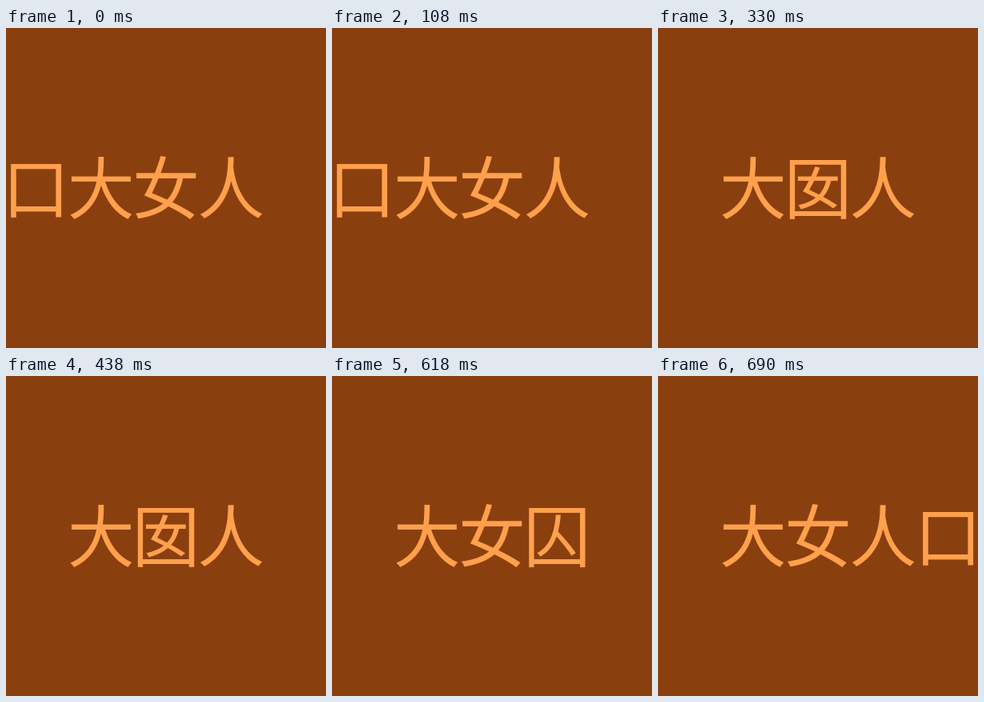
Recreate the animation shown at these times as an HTML page. Size 400 by 400 pixels, loop 0.84 s.

```html
<!DOCTYPE html>
<html lang="zh-Hans">
<head>
<meta charset="utf-8">
<style>
  html, body { margin: 0; width: 100%; height: 100%; overflow: hidden; background: #8a3f0f; }
  svg { display: block; width: 100vw; height: 100vh; }
  text {
    font: 84px "Noto Sans CJK SC", "Noto Sans CJK", sans-serif;
    fill: #ffa04d;
    text-anchor: middle;
  }
</style>
</head>
<body>
<svg viewBox="0 0 400 400"></svg>
<script>
  const PITCH = 81.2, BASELINE = 232;
  // Five slots per step: the box walks right and swallows each character in turn.
  const steps = [
    [0, "口大女人 "],
    [180, " 因女人 "],
    [330, " 大囡人 "],
    [510, " 大女囚 "],
    [690, " 大女人口"]
  ];
  const LOOP = 840;

  const svg = document.querySelector("svg");
  const slots = [-2, -1, 0, 1, 2].map(i => {
    const t = document.createElementNS(svg.namespaceURI, "text");
    t.setAttribute("x", 200 + i * PITCH);
    t.setAttribute("y", BASELINE);
    return svg.appendChild(t);
  });

  let shown = "";
  function draw() {
    const time = performance.now() % LOOP;
    const line = steps.findLast(([start]) => time >= start)[1];
    if (line !== shown) slots.forEach((t, i) => t.textContent = line[i].trim());
    shown = line;
    requestAnimationFrame(draw);
  }
  draw();
</script>
</body>
</html>
```
